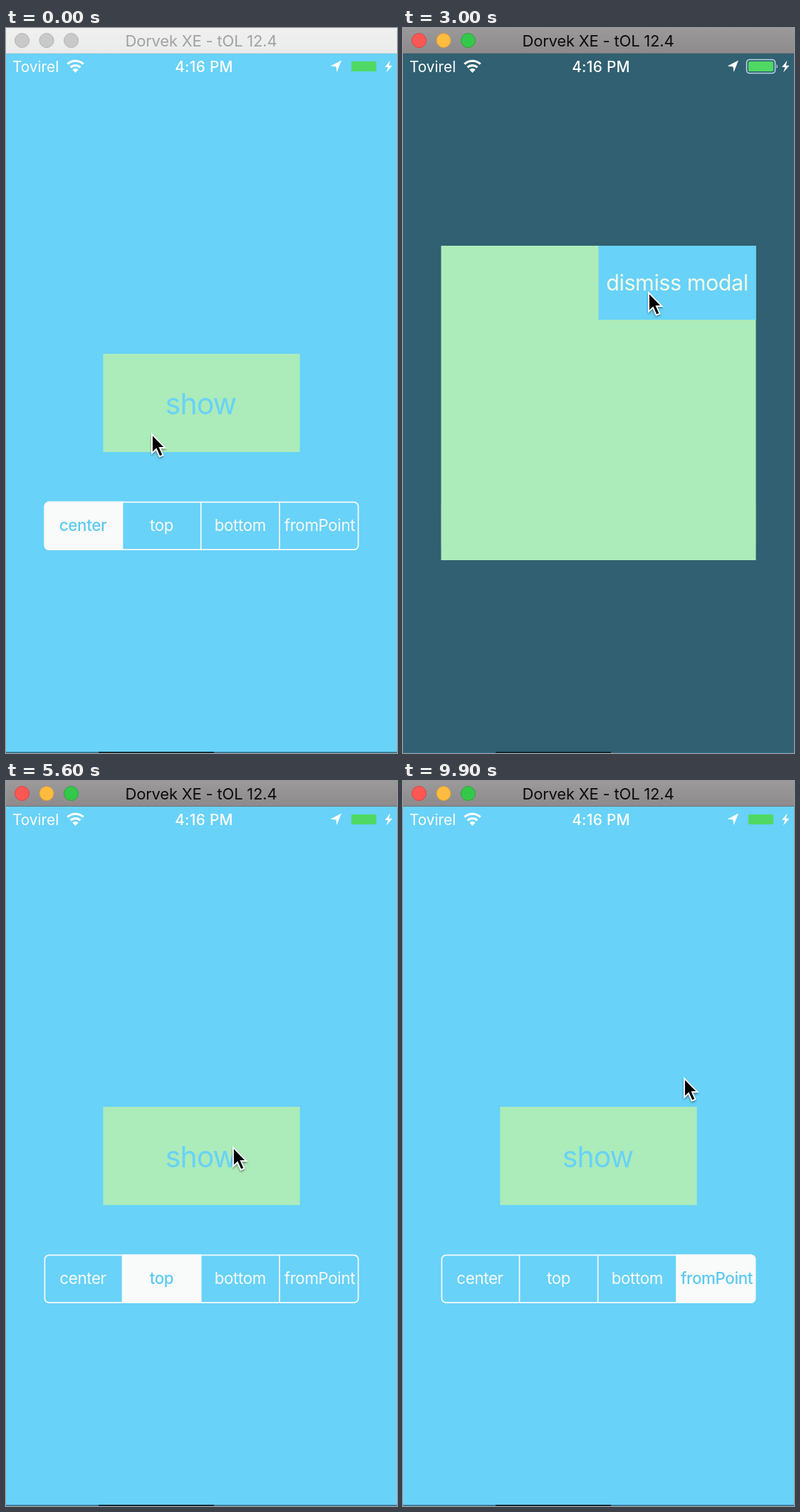
These frames come from a looping animation (549 by 1019 pixels, 10 s). An HTML page:

```html
<!DOCTYPE html>
<html lang="en">
<head>
<meta charset="utf-8">
<title>Modal positions</title>
<style>
  html, body { margin: 0; width: 100%; height: 100%; overflow: hidden; background: #68d2f8; }
  svg { display: block; width: 549px; height: 1019px; }
  text { font-family: Inter, Roboto, sans-serif; text-anchor: middle; }
  #segments text { font-size: 22.3px; letter-spacing: -.35px; }
</style>
</head>
<body>
<svg viewBox="0 0 549 1019">
  <defs>
    <linearGradient id="active" x2="0" y2="1">
      <stop stop-color="#9c999b"/><stop offset="1" stop-color="#8d8a8c"/>
    </linearGradient>
    <linearGradient id="inactive" x2="0" y2="1">
      <stop stop-color="#f0f0f0"/><stop offset="1" stop-color="#eaebeb"/>
    </linearGradient>
    <clipPath id="pill"><rect x="53.5" y="665.5" width="442" height="68.5" rx="7"/></clipPath>
    <clipPath id="screen"><rect y="36" width="549" height="981.5"/></clipPath>
    <filter id="shadow" x="-50%" y="-50%" width="200%" height="200%">
      <feDropShadow dx="0" dy="2" stdDeviation="1.5" flood-opacity=".4"/>
    </filter>
  </defs>

  <rect width="549" height="1019" fill="#68d2f8"/>
  <rect x="136.5" y="458" width="276" height="138" fill="#acebba"/>
  <text x="273.5" y="543" font-size="41" letter-spacing="-1" fill="#68d2f8">show</text>

  <g id="segments">
    <g clip-path="url(#pill)"><rect id="chosen" y="665" width="111" height="70" fill="#f9fafa"/></g>
    <rect x="54.4" y="666.3" width="440.2" height="66.9" rx="6" fill="none" stroke="#f9fafa" stroke-width="1.7"/>
    <path d="M163.5 666v67M273.7 666v67M384 666v67" stroke="#f9fafa" stroke-width="1.7"/>
  </g>

  <rect id="dim" y="36" width="549" height="982" opacity="0"/>

  <g clip-path="url(#screen)">
    <g id="modal">
      <rect x="-221" y="-221" width="442" height="442" fill="#acebba"/>
      <rect y="-221" width="221" height="104" fill="#68d2f8"/>
      <text x="110.5" y="-158" font-size="30.5" letter-spacing="-.45" fill="#f5fbea">dismiss modal</text>
    </g>
  </g>

  <g fill="#fff">
    <text x="9" y="61.5" font-size="20.8" style="text-anchor:start">Tovirel</text>
    <text x="278" y="61.5" font-size="20.8" font-weight="500" letter-spacing=".3">4:16 PM</text>
    <path d="M97.5 63l-4.2-4.5a6 6 0 0 1 8.4 0z"/>
    <path d="M90.6 55.3a10.3 10.3 0 0 1 13.8 0M86.3 50.6a16.6 16.6 0 0 1 22.4 0" fill="none" stroke="#fff" stroke-width="3.2"/>
    <path d="M471 45.5l-15.5 8 8 1.1 1 7.4z"/>
    <path d="M539.5 45.5l-7.5 9.5h4.5l-2.5 7.5 8.5-9.8h-4.8z"/>
    <g id="battery" opacity="0">
      <rect x="482.5" y="44.5" width="40" height="19" rx="4" fill="none" stroke="#b9d8e2" stroke-width="1.6"/>
      <path d="M524.5 51q3 3 0 6z" fill="#b9d8e2"/>
    </g>
    <rect x="485" y="47" width="35" height="14" rx="1.5" fill="#4fd964"/>
  </g>

  <rect id="bar" width="549" height="36"/>
  <path id="edge" d="M0 35.5h549"/>
  <g id="lights"></g>
  <text id="title" x="274" y="26" font-size="22" letter-spacing="-.2">Dorvek XE - tOL 12.4</text>

  <path d="M0 1018.3h549" stroke="#2d6884" stroke-width="1.5"/>
  <path d="M130 1018.3h162" stroke="#03131c" stroke-width="1.5"/>

  <path id="cursor" d="M0 0V26.5L6 20.8L10.7 31.3L15.4 29.2L10.8 19H18.5Z" stroke="#fff" stroke-width="1.8" filter="url(#shadow)"/>
</svg>

<script>
const LOOP = 10000, STEP = 100, FOCUS_AT = 600;
const HOME = [274.5, 527];

const MODALS = [
  { show: 1966, hide: 3000, from: HOME, zoom: true },
  { show: 4450, hide: 5100, from: [274.5, -190], to: [274.5, 257] },
  { show: 6700, hide: 7580, from: [274.5, 1240], to: [274.5, 796] },
  { show: 8268, hide: 9300, from: [450, -512], zoom: true }
];

const SEGMENTS = [
  { label: 'center', at: 0, x: 53, mid: 108 },
  { label: 'top', at: 3800, x: 163, mid: 218.5 },
  { label: 'bottom', at: 6000, x: 273.5, mid: 328.8 },
  { label: 'fromPoint', at: 8050, x: 384, mid: 440.5 }
];

// time, x, y
const POINTER = [
  [0, 205, 571], [1000, 205, 571], [1800, 283, 567], [2300, 283, 567],
  [2700, 345, 372], [3100, 345, 372], [3700, 237, 687], [4000, 237, 687],
  [4350, 300, 530], [4600, 300, 530], [4950, 365, 95], [5200, 365, 95],
  [5600, 319, 515], [5900, 325, 690], [6100, 325, 690], [6500, 306, 533],
  [7200, 306, 533], [7500, 385, 620], [7650, 385, 620], [7950, 435, 690],
  [8070, 435, 690], [8260, 291, 485], [8600, 291, 485], [9050, 385, 365],
  [9400, 385, 365], [9750, 395, 418], [LOOP, 395, 418]
];

const $ = id => document.getElementById(id);
const set = (el, attrs) => { for (const k in attrs) el.setAttribute(k, attrs[k]); return el; };
const add = (parent, tag, attrs) =>
  set(parent.appendChild(document.createElementNS('http://www.w3.org/2000/svg', tag)), attrs);
const mix = (a, b, p) => a + (b - a) * p;
const ease = x => { x = Math.min(1, Math.max(0, x)); return x * x * (3 - 2 * x); };

const labels = SEGMENTS.map(s => {
  const el = add($('segments'), 'text', { x: s.mid, y: 707 });
  el.textContent = s.label;
  return el;
});
const LIGHTS = [['#fc5753', '#dd4340'], ['#fdbc40', '#dc9e33'], ['#34c84a', '#29a63a']];
const lights = LIGHTS.map((c, i) => add($('lights'), 'circle', { cx: 22.5 + 34.5 * i, cy: 17.5, r: 10 }));

function drawTitleBar(active) {
  set($('bar'), { fill: active ? 'url(#active)' : 'url(#inactive)' });
  set($('edge'), { stroke: active ? '#6f7478' : '#cfd6d9' });
  set($('title'), { fill: active ? '#0c0c0c' : '#a2a2a2' });
  lights.forEach((el, i) => set(el, {
    fill: active ? LIGHTS[i][0] : '#c9c9c9',
    stroke: active ? LIGHTS[i][1] : '#b3b3b3'
  }));
}

function drawSegments(t) {
  const chosen = SEGMENTS.filter(s => t >= s.at).length - 1;
  set($('chosen'), { x: SEGMENTS[chosen].x });
  labels.forEach((el, i) => set(el, {
    fill: i === chosen ? '#5cc9f2' : '#f9fafa',
    'font-weight': i === chosen ? 500 : 400
  }));
}

function drawModal(t) {
  const m = MODALS.findLast(m => t >= m.show) || MODALS[0];
  const p = ease((t - m.show) / 400) * (1 - ease((t - m.hide) / 400));
  const to = m.to || HOME;
  const x = mix(m.from[0], to[0], p), y = mix(m.from[1], to[1], p);
  set($('modal'), {
    transform: `translate(${x} ${y}) scale(${m.zoom ? p : 1})`,
    opacity: m.zoom ? p ** .7 : p > 0 ? 1 : 0
  });
  set($('dim'), { opacity: .54 * p });
  set($('battery'), { opacity: Math.min(1, p * 1.6) });
}

function drawPointer(t) {
  const i = POINTER.findIndex(k => k[0] > t);
  const a = POINTER[i - 1], b = POINTER[i];
  const p = ease((t - a[0]) / (b[0] - a[0]));
  set($('cursor'), { transform: `translate(${mix(a[1], b[1], p)} ${mix(a[2], b[2], p)})` });
}

function draw(t) {
  drawTitleBar(t >= FOCUS_AT);
  drawSegments(t);
  drawModal(t);
  drawPointer(t);
}

const start = performance.now();
function tick() {
  const t = (performance.now() - start) % LOOP;
  draw(Math.floor(t / STEP) * STEP);
  requestAnimationFrame(tick);
}
tick();
</script>
</body>
</html>
```
